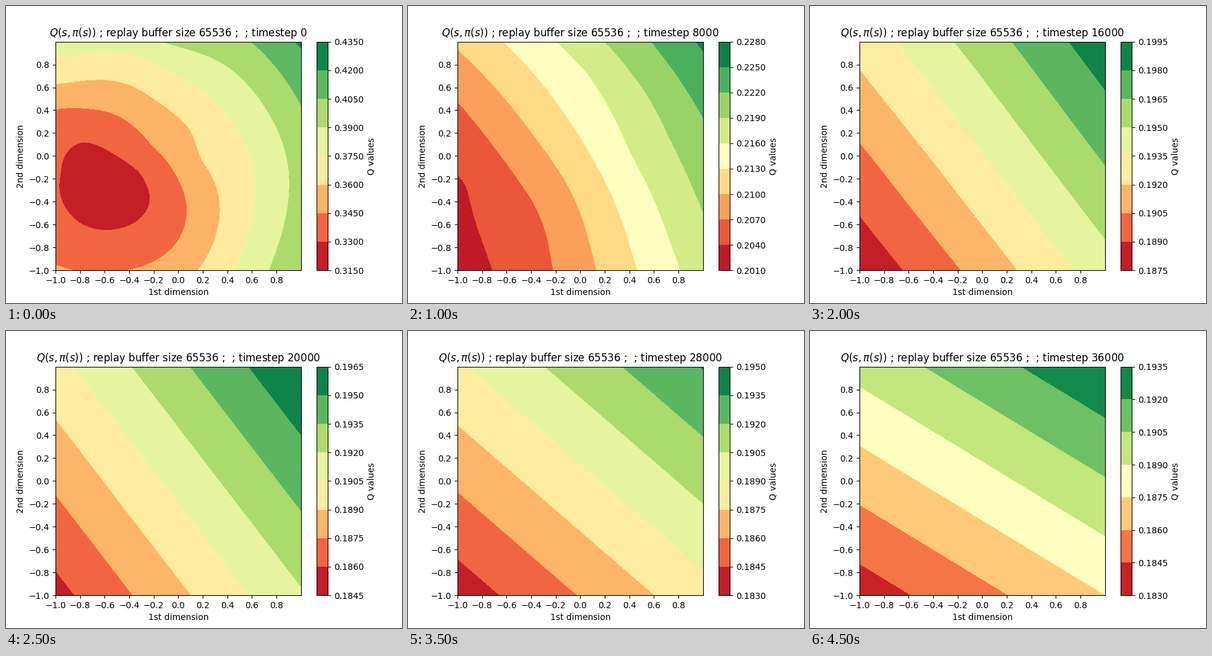
Recreate the animation shown at these times as a matplotlib script. Size 640 by 480 pixels, loop 4750 ms.

```python
import numpy as np
import matplotlib.pyplot as plt
from matplotlib.animation import FuncAnimation

plt.rcParams["text.kerning_factor"] = 6  # unkerned title text

LEFT, RIGHT, TOP, BOTTOM = 80, 476.8, 57.6, 427.2
GRID = 160
STEPS = 19
DECAY = 0.56  # share of the remaining change left after each step

# A few points in stage pixels on each contour, keyed by level
BOWL = {
    1: [(125, 220), (178, 241), (215, 268), (233, 312), (226, 333),
        (145, 361), (118, 350), (88, 270), (101, 233)],
    2: [(80, 167), (135, 166), (238, 227), (292, 320), (275, 384),
        (198, 427), (80, 419), (108, 427)],
    3: [(80, 126), (160, 119), (235, 147), (297, 199), (315, 245),
        (346, 332), (311, 427)],
    4: [(80, 84), (150, 75), (225, 86), (357, 174), (398, 250), (400, 330),
        (372, 427)],
    5: [(255, 58), (327, 81), (388, 124), (457, 265), (456, 320), (426, 427)],
    6: [(396, 58), (447, 112), (477, 160)],
    7: [(468, 58)],
}
SLOPE = {
    1: [(80, 285), (85, 291), (80, 305)],
    1.2: [(80, 427)],
    1.5: [(140, 335)],
    2: [(80, 151), (147, 238), (197, 319), (207, 372), (193, 427)],
    3: [(80, 73), (155, 148), (217, 233), (271, 375), (269, 427)],
    4: [(148, 58), (240, 163), (310, 290), (332, 427)],
    5: [(233, 58), (285, 108), (348, 243), (393, 427)],
    6: [(307, 58), (385, 155), (428, 268), (465, 427)],
    7: [(379, 58), (477, 214)],
    8: [(448, 58)],
}
RAMP = {
    0.6: [(80, 427)],
    1: [(80, 382), (120, 427)],
    2: [(80, 243), (239, 427)],
    3: [(80, 103), (205, 245), (350, 427)],
    4: [(167, 58), (280, 197), (455, 427)],
    5: [(291, 58), (390, 196), (477, 315)],
    6: [(406, 58), (477, 160)],
    6.66: [(477, 58)],
}

px, py = np.meshgrid(np.linspace(LEFT, RIGHT, GRID),
                     np.linspace(BOTTOM, TOP, GRID))
axis = np.linspace(-1, 1, GRID)


def kernel(a, b):
    d2 = ((a[:, None, :] - b[None, :, :]) ** 2).sum(axis=2)
    return d2 * np.log(d2 + 1e-12)


def spline(contours):
    """Thin-plate surface through the contour points."""
    pts = np.array([p for ps in contours.values() for p in ps]) / 100
    vals = np.array([v for v, ps in contours.items() for _ in ps])
    n = len(pts)
    poly = np.column_stack([np.ones(n), pts])
    system = np.block([[kernel(pts, pts), poly], [poly.T, np.zeros((3, 3))]])
    coef = np.linalg.solve(system, np.append(vals, np.zeros(3)))
    grid = np.column_stack([px.ravel(), py.ravel()]) / 100
    z = kernel(grid, pts) @ coef[:n] + coef[n] + grid @ coef[n + 1:]
    return z.reshape(px.shape)


def plane(x0, dx, dy):
    """Flat surface: level 1 meets the bottom edge at x0."""
    return 1 + (px - x0) / dx + (BOTTOM - py) / dy


# Q values at the key steps: lowest level + level spacing * surface
KEYS = {
    0: 0.3150 + 0.0150 * spline(BOWL),
    2: 0.2160 + 0.0080 * spline(SLOPE),
    6: 0.1940 + 0.0020 * spline(RAMP),
    10: 0.1845 + 0.0015 * plane(111, 94.2, 122.6),
    13: 0.1860 + 0.0015 * plane(200, 126.2, 101.2),
    16: 0.1815 + 0.0015 * plane(197, 124.2, 115.2),
    18: 0.1830 + 0.0015 * plane(164, 157, 95.6),
}


def q_values(i):
    """Values settle exponentially from one key step to the next."""
    if i in KEYS:
        return KEYS[i]
    a = max(k for k in KEYS if k < i)
    b = min(k for k in KEYS if k > i)
    t = (1 - DECAY ** (i - a)) / (1 - DECAY ** (b - a))
    return (1 - t) * KEYS[a] + t * KEYS[b]


fig = plt.figure(figsize=(6.4, 4.8), dpi=100)
ticks = np.arange(-1, 0.9, 0.2)


def draw(i):
    fig.clear()
    ax = fig.add_subplot()
    fill = ax.contourf(axis, axis, q_values(i), cmap="RdYlGn")
    fig.colorbar(fill, ax=ax, label="Q values", format="%.4f")
    ax.set(xticks=ticks, yticks=ticks, xlim=(-1, 1), ylim=(-1, 1),
           xlabel="1st dimension", ylabel="2nd dimension")
    ax.set_title(rf"$Q(s, \pi(s))$ ; replay buffer size 65536 ;  ; timestep {2000 * i}")
    return []


anim = FuncAnimation(fig, draw, frames=STEPS, interval=250,
                     repeat=True, repeat_delay=0)
plt.show()
```
